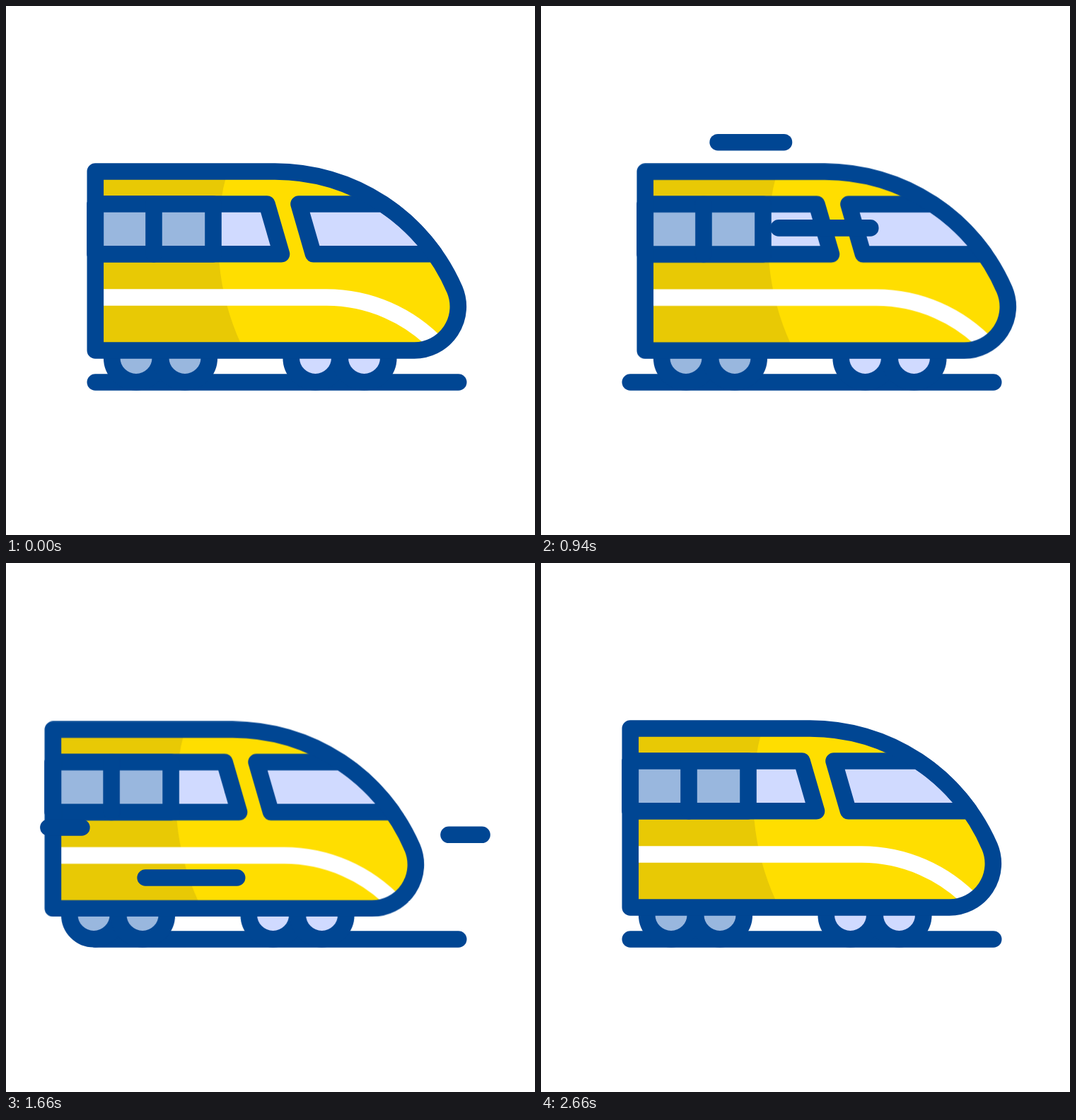
An HTML page without scripts for the animation above (2.8 s loop, 748x748 px).

```html
<!DOCTYPE html>
<html lang="en">
<head>
<meta charset="utf-8">
<title>Train</title>
<style>
  @property --lead { syntax: "<number>"; inherits: false; initial-value: 0; }
  @property --tail { syntax: "<number>"; inherits: false; initial-value: 0; }

  :root {
    --blue: #004693;
    --yellow: #ffde00;
    --yellow-shade: #e8c905;
    --glass: #d0daff;
    --glass-shade: #99b7de;
    --ease: cubic-bezier(.333, 0, .667, 1);
  }
  html, body { margin: 0; width: 100%; height: 100%; overflow: hidden; background: #fff; }
  svg { display: block; width: 100vw; height: 100vh; }

  .ink, .wheel { stroke: var(--blue); }
  svg { fill: none; stroke-width: 23.6; stroke-linecap: round; stroke-linejoin: round; }
  .glass { fill: var(--glass); }
  .shaded { fill: var(--glass-shade); }

  .train { animation: drive 2800ms var(--ease) infinite; }
  .cabin { animation: bounce 2800ms var(--ease) infinite; }
  @keyframes drive {
    0%, 6.25% { transform: translateX(0); }
    27.39% { transform: translateX(29.5px); }
    59.86% { transform: translateX(-60px); }
    93.18%, 100% { transform: translateX(0); }
  }
  @keyframes bounce {
    0%, 6.25%, 35.25%, 64.25%, 93.25%, 100% { transform: translateY(0); }
    20.75%, 49.75%, 78.75% { transform: translateY(5.5px); }
  }

  /* Each streak draws leftwards from its start, then erases the same way. */
  .streaks path {
    visibility: hidden;
    stroke-dasharray: calc(max(0, var(--lead) - var(--tail)) * 1px) 9px;
    stroke-dashoffset: calc(var(--tail) * -1px);
    animation: lead 2800ms var(--ease) infinite, tail 2800ms var(--ease) infinite, show 2800ms linear infinite;
    animation-delay: var(--at);
  }
  @keyframes lead {
    0% { --lead: 0; }
    17.5%, 100% { --lead: 1; }
  }
  @keyframes tail {
    0%, 7.14% { --tail: 0; }
    24.64%, 100% { --tail: 1; }
  }
  @keyframes show {
    0%, 24.6% { visibility: visible; }
    24.61%, 100% { visibility: hidden; }
  }
</style>
</head>
<body>
<svg viewBox="0 0 748 748">
  <path class="ink" d="M126.3 532H639.7"/>

  <g class="train">
    <g class="wheel">
      <g class="shaded">
        <circle cx="184" cy="497.4" r="34.3"/>
        <circle cx="253" cy="497.4" r="34.3"/>
      </g>
      <g class="glass">
        <circle cx="437.5" cy="497.4" r="34.3"/>
        <circle cx="506.5" cy="497.4" r="34.3"/>
      </g>
    </g>

    <g class="cabin">
      <path fill="var(--yellow)" d="M126.3 234H380A277 277 0 0 1 634.5 401A62 62 0 0 1 577.5 487H126.3Z"/>
      <path fill="var(--yellow-shade)" d="M126.3 234H313A356 356 0 0 0 336.6 487H126.3Z"/>
      <path stroke="#fff" stroke-linecap="butt" d="M126.3 412H453A217 217 0 0 1 612 481.3"/>
      <g class="ink">
        <path class="glass" d="M126.3 280H369L389.5 350.7H126.3Z"/>
        <path class="shaded" d="M126.3 280H293V350.7H126.3Z"/>
        <path d="M209 280V350.7"/>
        <path class="glass" d="M533 280H414L434.5 350.7H606A277 277 0 0 0 533 280Z"/>
        <path d="M126.3 234H380A277 277 0 0 1 634.5 401A62 62 0 0 1 577.5 487H126.3Z"/>
      </g>
    </g>
  </g>

  <g class="ink streaks">
    <path pathLength="1" style="--at:203ms" d="M673 384.3h-246"/>
    <path pathLength="1" style="--at:621ms" d="M500 313.9h-227"/>
    <path pathLength="1" style="--at:724ms" d="M344.3 192.7h-227"/>
    <path pathLength="1" style="--at:1189ms" d="M173 374h-113.5"/>
    <path pathLength="1" style="--at:1289ms" d="M391 445h-227"/>
    <path pathLength="1" style="--at:1524ms" d="M673 384.3h-246"/>
    <path pathLength="1" style="--at:1710ms" d="M391 445h-227"/>
    <path pathLength="1" style="--at:1863ms" d="M629 251.3h-227"/>
    <path pathLength="1" style="--at:1968ms" d="M344.3 192.7h-227"/>
  </g>
</svg>
</body>
</html>
```
